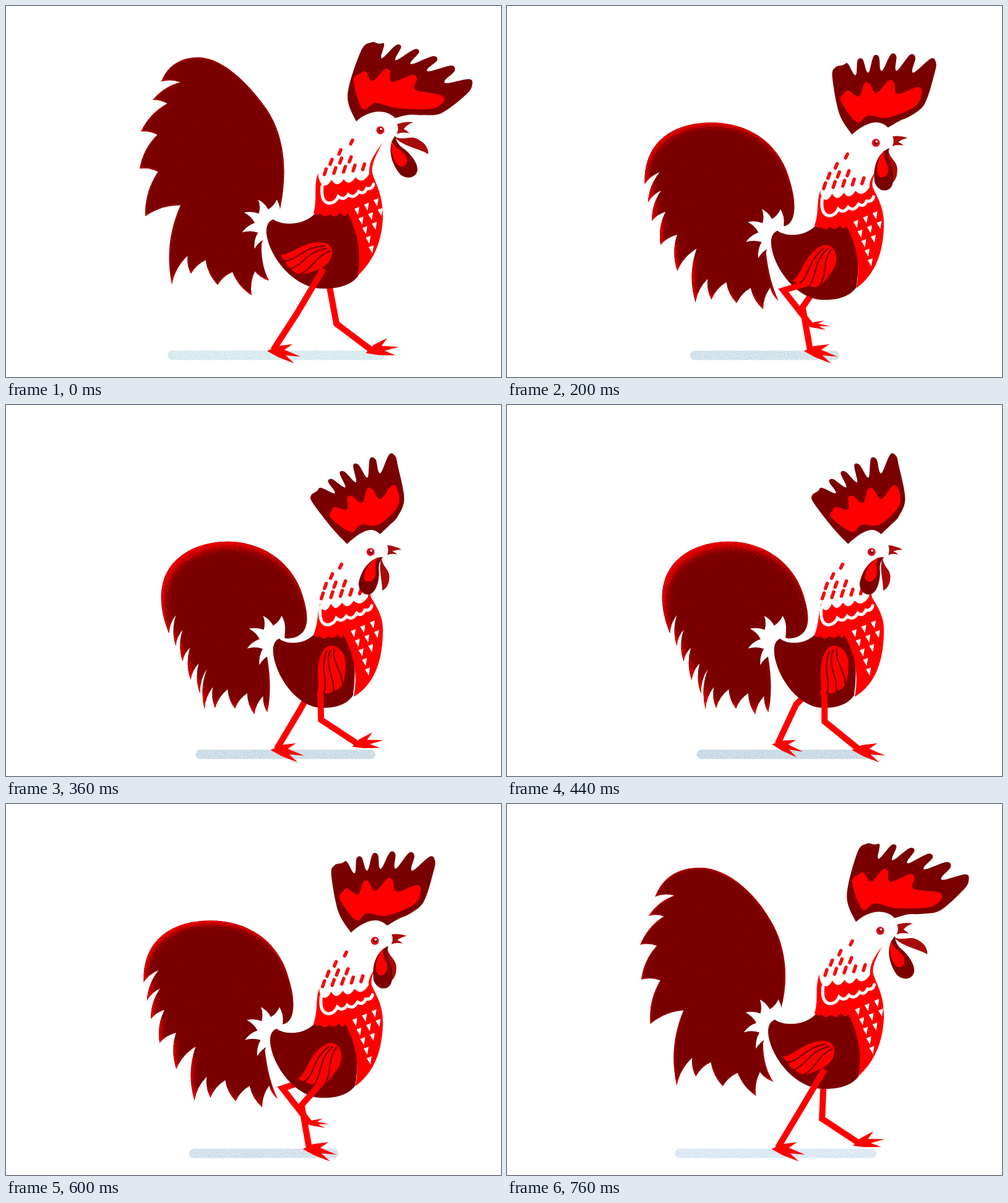
An HTML page for the animation above (800 ms loop, 800 by 600 pixels).

```html
<!DOCTYPE html>
<html lang="en">
<head>
<meta charset="utf-8">
<title>Walking rooster</title>
<style>
  html, body { margin: 0; width: 100%; height: 100%; overflow: hidden; background: #fff; }
  svg { display: block; width: 800px; height: 600px; }
</style>
</head>
<body>
<svg id="stage" viewBox="0 0 800 600">
  <defs>
    <filter id="rim" filterUnits="userSpaceOnUse" x="190" y="50" width="330" height="470" color-interpolation-filters="sRGB">
      <feOffset id="shift" in="SourceAlpha" dx="0" dy="0"/>
      <feGaussianBlur id="soft" stdDeviation="4" result="inner"/>
      <feTurbulence type="fractalNoise" baseFrequency=".8" numOctaves="2" seed="4" result="noise"/>
      <feComposite in="inner" in2="noise" operator="arithmetic" k1="0" k2="-2.2" k3="2.4" k4=".38" result="mask"/>
      <feFlood flood-color="#f00000"/>
      <feComposite in2="mask" operator="in"/>
      <feComposite in2="SourceAlpha" operator="in" result="glow"/>
      <feMerge><feMergeNode in="SourceGraphic"/><feMergeNode in="glow"/></feMerge>
    </filter>
    <filter id="grain" filterUnits="userSpaceOnUse" x="240" y="550" width="400" height="30" color-interpolation-filters="sRGB">
      <feTurbulence type="fractalNoise" baseFrequency=".8" numOctaves="2" seed="9"/>
      <feColorMatrix values="0 0 0 0 1  0 0 0 0 1  0 0 0 0 1  0 0 0 2.4 -1"/>
      <feComposite in2="SourceAlpha" operator="in" result="specks"/>
      <feMerge><feMergeNode in="SourceGraphic"/><feMergeNode in="specks"/></feMerge>
    </filter>
  </defs>
</svg>
<script>
const LOOP = 800, STEP = 40, TAU = Math.PI * 2;
const DARK = '#7a0000', RED = '#ff0000', FLAP = '#a80a0a';
const $ = id => document.getElementById(id);
const stage = $('stage');

function set(el, attrs) {
  for (const k in attrs) el.setAttribute(k, attrs[k]);
  return el;
}
const add = (tag, attrs = {}, parent = stage) =>
  parent.appendChild(set(document.createElementNS('http://www.w3.org/2000/svg', tag), attrs));
const path = (fill, d = '', more = {}, parent = stage) => add('path', { fill, d, ...more }, parent);
const move = (el, x, y, more = '') => set(el, { transform: `translate(${x} ${y}) ${more}` });

const range = (n, fn) => Array.from({ length: n }, (_, i) => fn(i));
const lerp = (a, b, f) => a + (b - a) * f;
const clamp = v => Math.max(0, Math.min(1, v));
const rad = deg => deg * Math.PI / 180;
// Point at a clockwise angle from straight up
const polar = (x, y, deg, r) => [x + r * Math.sin(rad(deg)), y - r * Math.cos(rad(deg))];

// Blend of two poses, or a parabola through three
function blend(keys, x) {
  const knots = keys.length > 2 ? [0, .6, 1] : [0, 1];
  const lists = keys.map(k => k.match(/-?[\d.]+/g).map(Number));
  const w = knots.map((a, i) => knots.reduce((m, b, j) => i === j ? m : m * (x - b) / (a - b), 1));
  return lists[0].map((_, n) => lists.reduce((s, l, i) => s + l[n] * w[i], 0));
}
function morph(keys, x) {
  const v = blend(keys, x);
  let i = 0;
  return keys[0].replace(/-?[\d.]+/g, () => v[i++].toFixed(2));
}

// Feather edges that bend to alternating sides
function teeth(pts, sign) {
  return pts.slice(1).map(([X, Y], i) => {
    const [x, y] = pts[i], k = .16 * (i % 2 ? -sign : sign);
    return `Q${(x + X) / 2 - (Y - y) * k} ${(y + Y) / 2 + (X - x) * k} ${X} ${Y}`;
  }).join('');
}

function spline(pts, closed) {
  const n = pts.length;
  const at = i => pts[closed ? (i + n) % n : Math.max(0, Math.min(n - 1, i))];
  return `M${at(0)}` + range(closed ? n : n - 1, i => {
    const [a, b, c, e] = [at(i - 1), at(i), at(i + 1), at(i + 2)];
    return `C${b.map((v, j) => v + (c[j] - a[j]) / 6)} ${c.map((v, j) => v - (e[j] - b[j]) / 6)} ${c}`;
  }).join('');
}

const crown = [
  'M443 328C457 262 448 205 420 165C392 125 350 84 312 83C283 83 262 95 251 122',
  'M446 356C470 352 466 310 456 280C440 220 390 187 330 187C260 187 220 225 222 285',
  'M455 378C494 376 488 340 483 320C470 260 420 221 357 221C280 223 225 275 264 370'
];
const tips = [
  '251 122 237 152 218 203 216 263 225 340 268 450 299 433 342 451 397 468 425 444',
  '222 285 227 315 233 345 247 384 274 427 304 479 330 474 371 480 414 490 439 476',
  '264 370 275 390 286 415 299 445 314 467 321 492 338 490 370 491 401 500 422 497'
];
const breastKeys = [
  'M505 269Q503 275 509 287Q518 296 526 281Q535 296 546 280Q554 293 565 277Q575 290 587 272C586 250 596 240 609 220C596 245 590 258 592 270C598 290 610 305 609 345C606 390 590 415 568 437Q578 385 552 335Q548 345 540 334Q533 345 524 337Q515 344 508 336Q502 340 497 335C504 310 496 290 505 269Z',
  'M509 319Q507 325 508 327Q517 340 525 322Q533 336 543 320Q552 333 562 317Q573 328 585 311C585 305 588 303 588 300C588 303 589 307 590 312C600 328 611 345 609 370C608 420 592 455 562 472Q572 420 545 372Q541 382 536 371Q530 381 521 374Q513 382 507 374Q501 378 497 372C506 350 502 335 509 319Z'
];
const beakKeys = [
  'M632 191Q645 186 658 188Q646 193 643 199Q649 202 652 206Q641 203 631 207Q636 199 632 191Z',
  'M616 227Q628 228 639 234Q630 235 624 237Q629 239 632 242Q622 240 616 243Q619 235 616 227Z'
];

function tailPath(q) {
  const flat = blend(tips, q), edge = [];
  for (let i = 0; i < 10; i++) {
    const [x, y, X, Y] = flat.slice(2 * i, 2 * i + 4);
    edge.push([x, y]);
    if (i === 9) break;
    // Cuts lean sideways on the raised tail and stand upright on the lowered one
    const lean = lerp(70 - 11 * i, 8, q);
    const depth = 40 - 1.5 * i + 47 * Math.exp(-2 * (i - 4) ** 2) * (1 - .6 * q);
    edge.push(polar((x + X) / 2, (y + Y) / 2, lean, depth));
  }
  return morph(crown, q) + teeth(edge, -1) +
    `Q${412 + 19 * q} ${420 + 40 * q} ${413 + 9 * q} ${385 + 22 * q}L${425 + 8 * q} ${345 + 28 * q}Z`;
}

function plumePath() {
  const fan = [[443, 338]];
  for (let i = 0; i < 5; i++) {
    fan.push(polar(425, 352, 18 - 42 * i, 41 + 1.5 * i), polar(425, 352, -3 - 42 * i, 23));
  }
  return `M443 338${teeth(fan, 1)}L442 354Z`;
}

// Comb points are polar around the crown of the head and swing more the higher they lie
function combPaths(x, y, swing) {
  const at = ([a, r]) => polar(x, y, a + swing * Math.min(1.1, r / 115), r * (1 + swing * .003));
  const outer = [[-96, 29], [-59, 58], [-36, 108], [-30, 119]];
  for (let i = 0; i < 6; i++) {
    const a = -22 + 12.2 * i, grow = 1.5 * i * i;
    outer.push([a - 2, 117 + grow], [a + 2, 117 + grow]);
    if (i < 5) outer.push([a + 4.8, 98 + grow], [a + 7.4, 98 + grow]);
  }
  outer.push([45, 141], [60, 100], [66, 71], [67, 51], [73, 30]);

  const inner = [[-51, 27], [-44, 69]];
  for (let i = 0; i < 4; i++) {
    const a = -31 + 26 * i, r = 76 + 3.3 * i * i;
    inner.push([a - 3, r], [a + 3, r]);
    if (i < 3) inner.push([a + 13, 61 + 4 * i * i]);
  }
  inner.push([58, 84], [49, 38], [-6, 28]);

  const pts = outer.map(at), [x0, y0] = pts[0], [x1, y1] = pts[pts.length - 1];
  return [
    spline(pts) + `C${x1 - 14} ${y1 - 15} ${x0 + 22} ${y0 - 20} ${x0} ${y0}Z`,
    spline(inner.map(at), true) + 'Z'
  ];
}

const fleckPath = () => [3, 3, 2, 1, 1].map((n, r) => range(n, i => {
  const x = 567 + 7 * r - .3 * r * r + 15.5 * i, y = 333 + 15.5 * r - 7 * i;
  return `M${x - 4} ${y - 5}L${x + 4} ${y - 8}L${x + 2} ${y + 5}Z`;
}).join('')).join('');

const dropPath = p => [5, 3, 1, 1].map((n, r) => range(n, i => {
  const x = 516 + 15.5 * i + 7 * r + 2.4 * r * r - p * (5 + 4.3 * r);
  const y = 268 - 16 * r - 2 * i + 41 * p, h = 4.5 - .5 * r;
  return `M${x + 1.5} ${y - h}L${x - 1.5} ${y + h}`;
}).join('')).join('');

function makeLeg() {
  return {
    bone: path('none', '', { stroke: RED, 'stroke-width': 10 }),
    foot: path(RED, 'M-10 2L6 -6L31 -9L18 0L44 11L20 9L34 22L8 12Z')
  };
}
// First half of the cycle swings the foot forward, second half drags it back
function poseLeg(leg, t, hipX, hipY, lean) {
  const a = TAU * t / LOOP, lift = Math.max(0, Math.sin(a)) ** 1.35;
  const s = t / 400, reach = 1 - Math.abs(s - 1);
  const x = 432 + 158 * reach ** 1.45, y = 556 - 41 * lift;
  const knee = polar(x, y, -10 + 43 * Math.cos(a) - 28 * lift, 70);
  const hip = [hipX - lean * Math.cos(a) - 24 * lift, hipY];
  const turn = s < 1 ? 8 * Math.sin(TAU * s) - 20 * s * s : -20 * clamp(1 - 10 * (s - 1));
  set(leg.bone, { d: `M${hip}L${knee}L${x} ${y}` });
  move(leg.foot, x, y, `rotate(${turn}) scale(${1 - .27 * lift} ${1 - .5 * lift})`);
}

const shade = add('rect', { y: 557.5, height: 15, rx: 7.5, filter: 'url(#grain)' });
const tail = path(DARK, '', { filter: 'url(#rim)' });
const plume = path('#fff', plumePath());
const farLeg = makeLeg();
const body = path(DARK, 'M-73 345C-60 355 -25 356 -6 336L50 330Q75 375 64 437C50 455 25 457 7 457C-40 457 -80 405 -84 368C-85 355 -81 348 -73 345Z');
const breast = path(RED);
const band = path('none', 'M511 291Q508 318 523 319Q533 318 537 308Q546 316 553 305Q562 313 570 300Q578 306 583 295Q592 297 594 288',
  { stroke: '#fff', 'stroke-width': 5, 'stroke-linecap': 'round' });
const fleck = path('#fff', fleckPath());
const drops = path('none', '', { stroke: '#f01010', 'stroke-width': 5.5, 'stroke-linecap': 'round' });
const nearLeg = makeLeg();
const wing = add('g');
path(RED, 'M-67 5C-50 6 -35 -14 -5 -15C10 -15 17 -8 16 3C14 20 0 28 -15 32Q-24 36 -33 37Q-46 36 -50 27Q-58 26 -60 14Q-66 12 -67 5Z', {}, wing);
path('none', 'M-61 15C-40 15 -30 -8 4 -9M-51 28C-28 20 -25 0 8 -5M-36 37C-15 28 -12 8 13 -1', { stroke: DARK, 'stroke-width': 2.4 }, wing);
const comb = path(DARK);
const inner = path(RED);
const flap = path(FLAP, 'M0 0C2 19 18 19 16 39C16 49 10 57 5 59C4 39 -6 19 0 0Z');
const wattle = add('g');
path(DARK, 'M0 0C-20 5 -32 30 -30 55C-26 70 -13 73 -6 68C4 62 4 38 -2 22C-5 12 -2 5 0 0Z', {}, wattle);
path(RED, 'M-9 3C-22 15 -30 40 -20 47C-12 51 -4 42 -5 32C-7 22 -12 15 -9 3Z', {}, wattle);
const beak = path(FLAP);
const eye = add('g');
add('circle', { r: 6.5, fill: '#e3101a' }, eye);
add('circle', { r: 3, fill: DARK }, eye);
add('circle', { cx: 1, cy: -2, r: 1.8, fill: '#fff' }, eye);

function groundColor(t) {
  const [a, b, f] = t < 430
    ? [[205, 229, 234], [188, 207, 221], t / 430]
    : [[188, 207, 221], [214, 228, 243], (t - 430) / 370];
  return `rgb(${a.map((v, i) => Math.round(lerp(v, b[i], f)))})`;
}

function draw(t) {
  const u = 1 - Math.abs(t / 400 - 1), a = TAU * t / LOOP;
  const wave = (1 - Math.cos(a)) / 2;
  const p = Math.min(1.1 * u, 1.04);                          // body bob
  const q = 1.015 * (Math.sin(Math.PI * u / 2) + wave) / 2;   // tail drop
  const sway = .55 * u + .51 * wave;                          // head parts

  const left = 261 + 46 * Math.sin(a / 2) ** .8;
  const right = 537 + 75 * Math.abs(1 - 2 * u);
  set(shade, { x: left, width: right - left, fill: groundColor(t) });

  set(tail, { d: tailPath(q) });
  set($('shift'), { dx: 5 * q, dy: 9 * q });
  set($('soft'), { stdDeviation: 3 + 8 * q });
  move(plume, 8 * p, 28 * p);

  poseLeg(farLeg, (t + 400) % LOOP, 504, 428 + 38 * p, 14);
  poseLeg(nearLeg, t, 513, 425 + 40 * p, 0);

  move(body, 505, 33 * p, `scale(${1 - .13 * p} 1)`);
  set(breast, { d: morph(breastKeys, p) });
  move(band, -3 * p, 37 * p);
  move(fleck, -6 * p, 38 * p);
  set(drops, { d: dropPath(p) });
  move(wing, 519 - 8 * Math.cos(a) - 5 * Math.sin(a), 397 + 8 * p, `rotate(${-66 * sway})`);

  const [outline, middle] = combPaths(597 - 19 * p, 187 + 33 * p, 26 - 45 * sway);
  set(comb, { d: outline });
  set(inner, { d: middle });

  const fold = clamp((u - .15) / .4), ease = fold * fold * (3 - 2 * fold);
  const rootX = 629 - 20 * p, rootY = 210 + 36 * p;
  move(flap, rootX - 2, rootY + 1, `rotate(${-58 + 62 * ease}) scale(${lerp(1.05, .9, p)})`);
  move(wattle, rootX, rootY, `rotate(${-36 + 50 * q}) scale(${lerp(1, .93, p)})`);
  set(beak, { d: morph(beakKeys, p) });
  move(eye, 605 - 16 * p, 201 + 37 * p);
}

let shown = -1;
function tick() {
  const t = Math.floor(performance.now() % LOOP / STEP) * STEP;
  if (t !== shown) draw(shown = t);
  requestAnimationFrame(tick);
}
tick();
</script>
</body>
</html>
```
